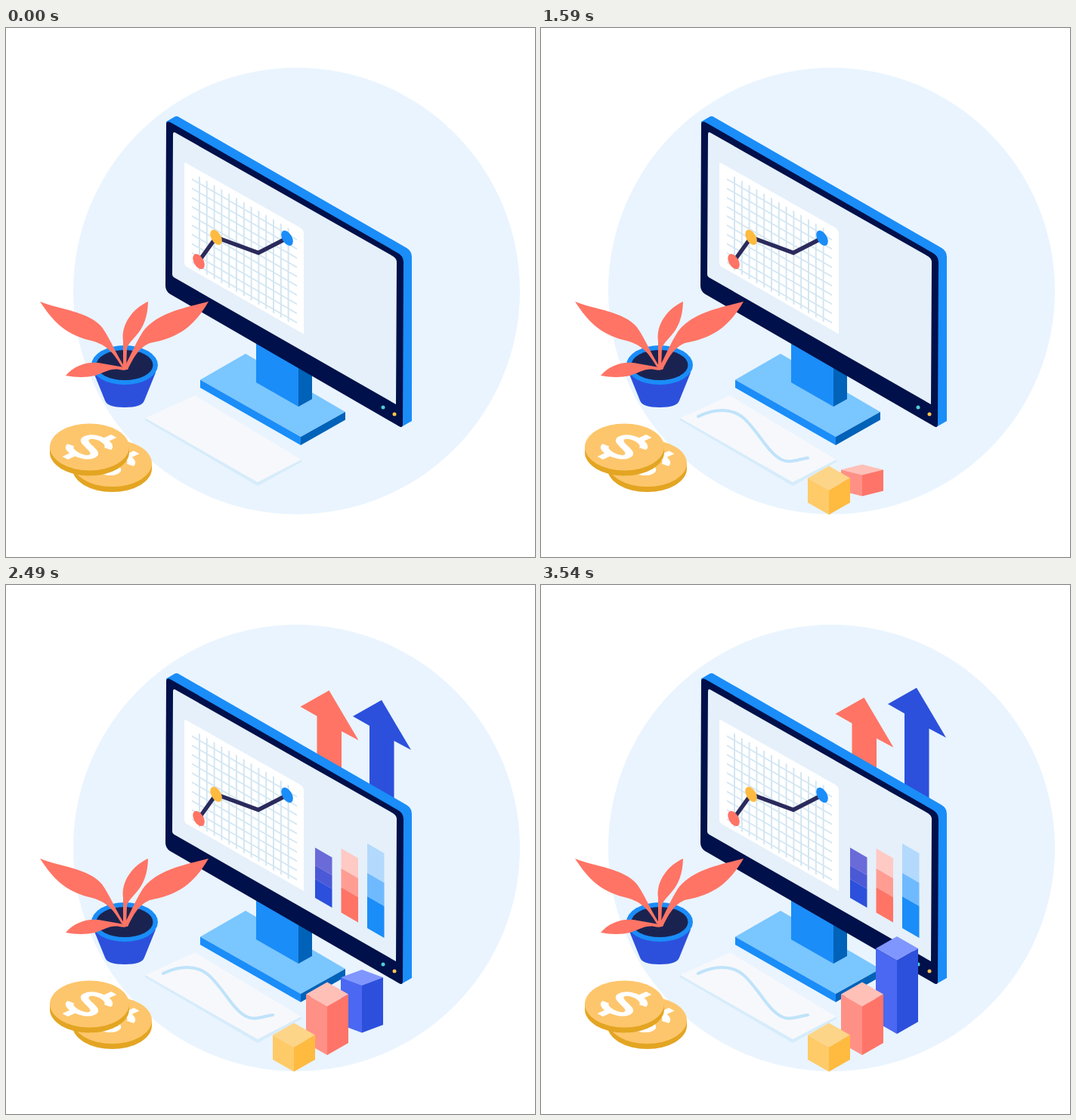
An HTML page for the animation above (3570 ms loop, 700 by 700 pixels).

```html
<!DOCTYPE html>
<html lang="en">
<head>
<meta charset="utf-8">
<title>Growth dashboard</title>
<style>
  html, body { margin: 0; height: 100%; overflow: hidden; background: #fff; }
  svg { display: block; width: 100%; height: 100%; }
</style>
</head>
<body>
<svg viewBox="0 0 700 700">
  <defs>
    <path id="arrow" d="M0 0L-38 21.500L-16 34V250L16.500 268V54L39 66Z"/>
    <g id="coin">
      <path d="M-52.500 0V7A52.500 31 0 0 0 52.500 7V0Z" fill="#e3a522"/>
      <ellipse rx="52.500" ry="31" fill="#fdc66c"/>
      <path transform="matrix(.8 .45 -.85 .38 0 0)" fill="none" stroke="#fff" stroke-width="9"
        d="M16 -13C12 -26 -17 -26 -17 -12C-17 3 17 -3 17 12C17 26 -14 26 -17 13M0 -38V-21M0 21V38"/>
    </g>
  </defs>

  <circle cx="384.500" cy="348" r="295.500" fill="#e9f4fe"/>
  <use id="redArrow" href="#arrow" fill="#ff7465"/>
  <use id="blueArrow" href="#arrow" fill="#2c50dc"/>

  <g id="stand">
    <path d="M257 465.500L317 431L449 508L390 541Z" fill="#7ac6ff"/>
    <path d="M257 465.500L390 541V552L257 476Z" fill="#1a8df8"/>
    <path d="M390 541L449 508V518.500L390 552Z" fill="#0062b8"/>
    <path d="M331 410L387 440V501L331 469Z" fill="#1a8df8"/>
    <path d="M387 440L405 450V491L387 501Z" fill="#0062b8"/>
  </g>

  <g id="monitor">
    <path d="M212 124L223 117.500Q226 116 229 118L530 291Q537 295 537 303V520L523 528L212 340Z" fill="#1a8df8"/>
    <path d="M212 128Q212 122 218 125L519 298Q526 302 526 310L525 524Q525 530 520 527L217 352Q211 348 211 341Z" fill="#00104a"/>
    <path d="M221 141Q221 136 225 139L512 302Q517 305 517 310L516 498L224 331Q220 329 220 326Z" fill="#e5f0fa"/>
    <circle cx="499" cy="502" r="2.500" fill="#4fd0d8"/>
    <circle cx="514" cy="511" r="2.500" fill="#ffc44d"/>
    <path d="M236 180Q236 177 239 179L389 264Q394 267 394 272V405L239 316Q236 314 236 311Z" fill="#fff"/>
    <path id="grid" transform="matrix(1 .577 0 1 246 198)" stroke="#d3e6f2" stroke-width="2"/>
    <path d="M255 309L278 277L334 297.500L372 278" fill="none" stroke="#2a2a5c" stroke-width="5.500"/>
    <circle r="9" transform="matrix(.866 .5 0 1 255 309)" fill="#ff7465"/>
    <circle r="9" transform="matrix(.866 .5 0 1 278 277)" fill="#ffbb40"/>
    <circle r="9" transform="matrix(.866 .5 0 1 372 278)" fill="#1a8df8"/>
  </g>
  <g id="bars"></g>

  <g id="sheet">
    <path d="M184 516L250 486L391 571V574L333 606L184 519Z" fill="#d6ecfa"/>
    <path d="M184 516L250 486L391 571L333 601Z" fill="#f7f8fc"/>
    <path id="curve" pathLength="1" fill="none" stroke="#bfe3fa" stroke-width="4" stroke-linecap="round"
      d="M208 514C228 504 252 502 268 516C288 534 300 562 318 571C330 577 342 570 353 569"/>
  </g>

  <g id="plant">
    <path d="M116 456L131 493Q134 502 157 502Q180 502 183 493L198 456Z" fill="#2c50dc"/>
    <ellipse cx="157" cy="446" rx="44" ry="26" fill="#1a8df8"/>
    <ellipse cx="157" cy="446" rx="37.500" ry="20" fill="#1a2350"/>
    <g fill="#ff7465">
      <path d="M45 362C72 373 110 375 127 396C138 411 147 435 159 451L153 448C141 427 131 418 110 413C78 405 62 388 45 362Z"/>
      <path d="M188 362C168 371 152 392 155 414L155 452H159L160 424C164 410 187 404 188 362Z"/>
      <path d="M268 362C235 370 198 378 181 402C172 416 165 433 155 452H161C167 440 174 424 190 417C220 411 245 402 268 362Z"/>
      <path d="M79 460C91 446 110 440 128 444L162 450Q160 454 150 452C138 450 130 456 118 460Q100 464 79 460Z"/>
    </g>
  </g>

  <use href="#coin" x="140.500" y="576"/>
  <use href="#coin" x="110.500" y="554.500"/>
  <g id="boxes"></g>
</svg>
<script>
const LOOP = 3570;
const get = id => document.getElementById(id);
const clamp = x => Math.min(1, Math.max(0, x));
const progress = (t, start, end) => clamp((t - start) / (end - start));
const smooth = u => (1 - Math.cos(Math.PI * u)) / 2;

function addPath(parent, d, fill) {
  const path = document.createElementNS('http://www.w3.org/2000/svg', 'path');
  path.setAttribute('d', d);
  path.setAttribute('fill', fill);
  parent.append(path);
}

let grid = '';
for (let i = 0; i < 10; i++) grid += `M0 ${2 + 12.2 * i}h139`;
for (let i = 0; i < 13; i++) grid += `M${10 + 9.8 * i} -7v124`;
get('grid').setAttribute('d', grid);

// Stacked bars: left edge, band boundaries from top to bottom, band colours
[
  [409, [347.5, 371, 389, 414], ['#6a6ad8', '#4c59d6', '#2c50dc']],
  [443.5, [348.5, 375, 400, 433.5], ['#ffcac4', '#ff9d92', '#ff7465']],
  [478, [342, 381, 412, 454], ['#b3d9fc', '#6fbaff', '#1a8df8']]
].forEach(([x, edges, colors]) => colors.forEach((color, i) =>
  addPath(get('bars'), `M${x} ${edges[i]}l22.500 13V${edges[i + 1] + 13}l-22.500 -13Z`, color)));

// Boxes grow vertically from a baseline near their foot
const boxes = [
  { x: 471, top: 465, bottom: 594, start: 2140, end: 2730, colors: ['#8096ff', '#4a68f2', '#2c50dc'] },
  { x: 425, top: 525.5, bottom: 622, start: 1330, end: 1900, colors: ['#ffc0b8', '#ff9086', '#ff7468'] },
  { x: 381, top: 579.5, bottom: 644, start: 550, end: 1060, colors: ['#fdd588', '#ffcb69', '#ffbb40'] }
].map(box => {
  const { x, top, bottom, colors } = box;
  const node = document.createElementNS('http://www.w3.org/2000/svg', 'g');
  addPath(node, `M${x} ${top}l28 16l-28 16l-28 -16Z`, colors[0]);
  addPath(node, `M${x - 28} ${top + 16}l28 16V${bottom}l-28 -16Z`, colors[1]);
  addPath(node, `M${x + 28} ${top + 16}l-28 16V${bottom}l28 -16Z`, colors[2]);
  get('boxes').append(node);
  return { ...box, node, base: bottom - 4.5 };
});

const arrows = [
  { node: get('redArrow'), x: 427.5, y: 149, peak: 2242, overshoot: 88 },
  { node: get('blueArrow'), x: 497, y: 136, peak: 2677, overshoot: 75 }
];

// Rise past the resting place, then settle back
function arrowOffset(t, { peak, overshoot }) {
  if (t < peak) return 150 * ((peak - t) / 262) ** 1.45 - overshoot;
  return -overshoot * (1 - progress(t, peak, peak + 370)) ** 2;
}

function draw(t) {
  for (const arrow of arrows) {
    const fadeStart = arrow.peak - 650;
    arrow.node.setAttribute('transform', `translate(${arrow.x} ${arrow.y + arrowOffset(t, arrow)})`);
    arrow.node.setAttribute('opacity', progress(t, fadeStart, fadeStart + 430));
  }
  for (const { node, base, start, end } of boxes) {
    const scale = smooth(progress(t, start, end));
    node.setAttribute('transform', `translate(0 ${base * (1 - scale)}) scale(1 ${scale})`);
    node.setAttribute('visibility', scale > 0 ? 'visible' : 'hidden');
  }
  const shown = smooth(progress(t, 2100, 2390));
  get('bars').setAttribute('transform', `translate(0 ${156 * (1 - shown)})`);
  get('bars').setAttribute('opacity', shown);

  const drawn = smooth(progress(t, 550, 1320));
  get('curve').setAttribute('stroke-dasharray', `${drawn} 2`);
  get('curve').setAttribute('visibility', drawn > 0 ? 'visible' : 'hidden');
}

function tick() {
  draw(performance.now() % LOOP);
  requestAnimationFrame(tick);
}
tick();
</script>
</body>
</html>
```
